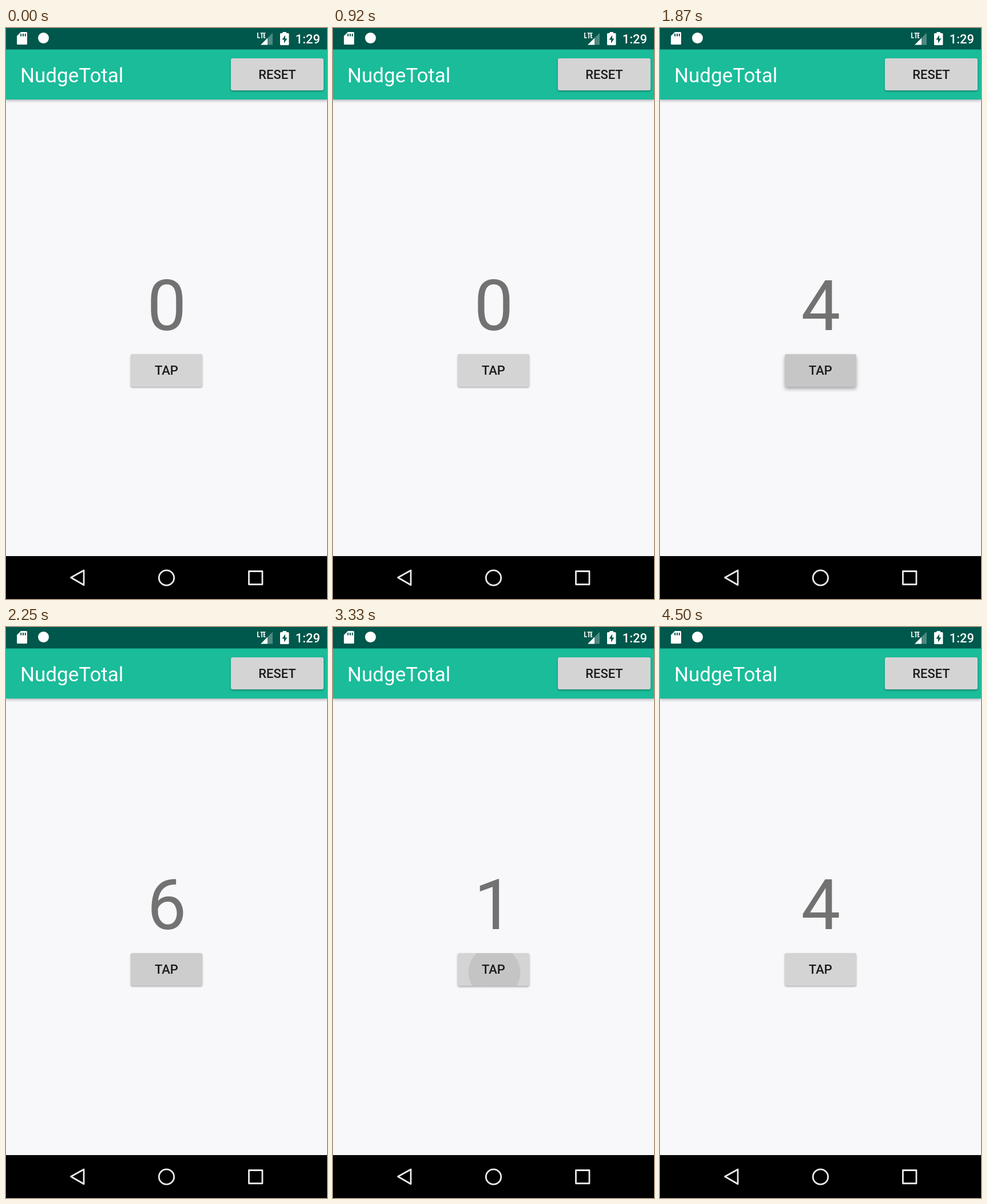
Animation of 561 by 998 pixels, one loop 4540 ms. Source, as an HTML page:

```html
<!DOCTYPE html>
<html lang="en">
<head>
<meta charset="utf-8">
<title>NudgeTotal</title>
<style>
  html, body { margin: 0; width: 100%; height: 100%; overflow: hidden; background: #f8f8fb; }
  svg { position: absolute; left: 0; top: 0; }
  text, .button { font-family: Roboto, sans-serif; }
  .bar { filter: drop-shadow(0 2px 2.5px rgba(0, 0, 0, .3)); }
  .button {
    position: absolute; border-radius: 3px; color: #1b1b1b;
    font-size: 22px; font-weight: 500; text-align: center;
  }
  #reset { left: 393px; top: 53px; width: 162px; height: 56px; line-height: 58px; }
  #tap { left: 218px; top: 570px; width: 125px; height: 57px; line-height: 58px; }
</style>
</head>
<body>
<svg width="561" height="998" viewBox="0 0 561 998">
  <rect class="bar" y="37" width="561" height="88" fill="#1abc9a"/>
  <rect width="561" height="37.5" fill="#00574b"/>
  <rect y="923" width="561" height="75"/>

  <g fill="#fff">
    <path d="M26 7H35.500Q37 7 37 8.500V27.500Q37 29 35.500 29H20.500Q19 29 19 27.500V14Z"/>
    <path d="M26.200 10v4.500M30 10v4.500M33.800 10v4.500" stroke="#00574b" stroke-width="2"/>
    <circle cx="65.500" cy="17.500" r="9.500"/>
    <path d="M440 8V17H444M444.500 9H450M447.200 9V18M453.500 9H450.900V17H453.500M451 13H453" fill="none" stroke="#fff" stroke-width="1.700"/>
    <path d="M445 29.500L457 17.500V29.500Z"/>
    <path d="M457 17.500L466 8.500V29.500H457Z" opacity=".3"/>
    <path d="M483.500 7H490V9H493Q494.500 9 494.500 10.500V28.500Q494.500 30 493 30H480.500Q479 30 479 28.500V10.500Q479 9 480.500 9H483.500Z"/>
    <path d="M488 12.500L482.500 20.500H486V26.500L491.500 18.500H488Z" fill="#00574b"/>
    <text x="549" y="27" font-size="22" font-weight="500" text-anchor="end">1:29</text>
    <text x="25" y="95" font-size="35">NudgeTotal</text>
  </g>

  <text id="count" x="281" y="528" font-size="122.500" text-anchor="middle" fill="#727272">0</text>

  <g fill="none" stroke="#ececec" stroke-width="2.800" stroke-linejoin="round">
    <path d="M113.500 960.500L136 948V973.500Z"/>
    <circle cx="280.500" cy="961" r="13.200"/>
    <rect x="424.500" y="949.500" width="23.500" height="23"/>
  </g>
</svg>
<div class="button" id="reset">RESET</div>
<div class="button" id="tap">TAP</div>

<script>
  const LOOP = 4540, RESET_AT = 2810, LEAD = 30;
  const taps = [1210, 1400, 1575, 1750, 1920, 2090, 3290, 3500, 3700, 3900];
  const byId = id => document.getElementById(id);
  const count = byId('count'), tap = byId('tap'), reset = byId('reset');
  const ramp = (x, a, b) => Math.min(1, Math.max(0, (x - a) / (b - a)));

  // Ripple grows from the touch point, the button rises, then both fade.
  function paint(button, age, width, height) {
    const radius = width * (.1 + age * .0037);
    const alpha = .075 * ramp(age, 0, 30) * (1 - ramp(age, 140, 230));
    const lift = ramp(age, 60, 120) * (1 - ramp(age, 140, 190));
    button.style.background = `radial-gradient(circle at ${width / 2 + 1.5}px ${height / 2 + 5}px,
      rgba(0,0,0,${alpha}) ${radius}px, transparent ${radius + 1}px) #d4d4d5`;
    button.style.boxShadow = `0 ${1.5 + 3 * lift}px ${3 + 4 * lift}px rgba(0,0,0,.32)`;
  }

  function draw(now) {
    const t = now % LOOP;
    const start = t < RESET_AT ? 0 : RESET_AT;
    count.textContent = taps.filter(p => p >= start && p <= t).length;
    const last = taps.filter(p => p - LEAD <= t).pop();
    paint(tap, last ? t - last + LEAD : 1000, 125, 57);
    paint(reset, t < RESET_AT - LEAD ? 1000 : t - RESET_AT + LEAD, 162, 56);
  }

  let origin;
  function frame(now) {
    origin ??= now;
    draw(now - origin);
    requestAnimationFrame(frame);
  }
  draw(0);
  requestAnimationFrame(frame);
</script>
</body>
</html>
```
